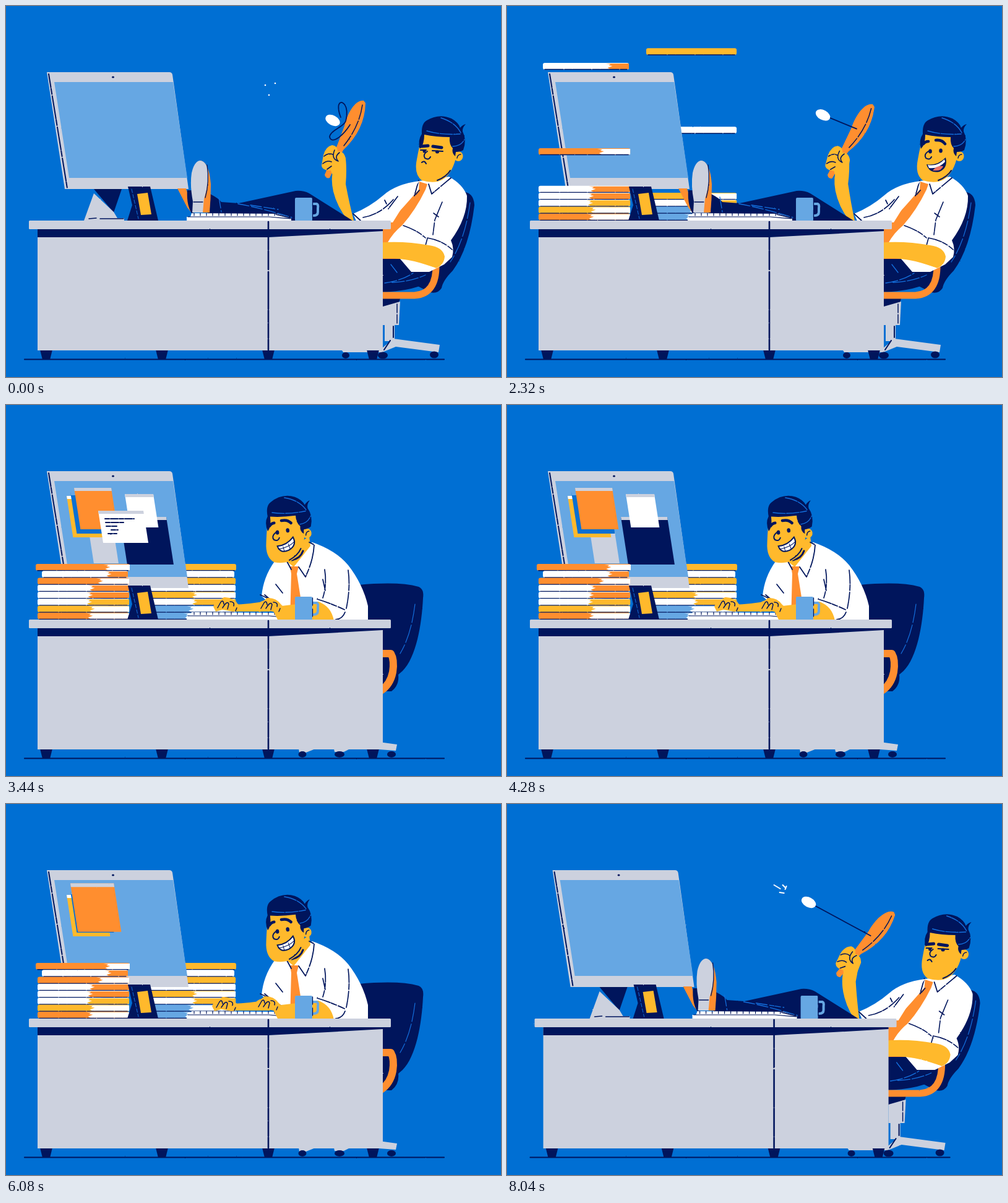
An HTML page that plays this animation: 800 px wide and 600 px high, repeating every 8120 ms.

```html
<!DOCTYPE html>
<html lang="en">
<head>
<meta charset="utf-8">
<title>Busy desk</title>
<style>
html, body { margin: 0; width: 100%; height: 100%; overflow: hidden; background: #006fd3; }
svg { display: block; width: 800px; height: 600px; }
</style>
</head>
<body>
<svg viewBox="0 0 800 600">
  <defs>
    <filter id="rough" filterUnits="userSpaceOnUse" x="0" y="0" width="800" height="600" color-interpolation-filters="sRGB">
      <feTurbulence type="fractalNoise" baseFrequency="0.35" numOctaves="1" seed="4" result="grain"/>
      <feDisplacementMap in="SourceGraphic" in2="grain" scale="1.7" xChannelSelector="R" yChannelSelector="G"/>
    </filter>
  </defs>
  <rect width="800" height="600" fill="#006fd3"/>
  <g id="stage" filter="url(#rough)"></g>
</svg>
<script>
const LOOP = 8120, STEP = 40;
const SIT = 3160, SIP = 6640, THROW = 2680, SLIDE = 7520;
const NAVY = '#00155c', GREY = '#ccd1de', SKY = '#66a7e3', BLUE = '#1470de',
      ORANGE = '#ff8e2f', SKIN = '#ffb92c', WHITE = '#fff', PINK = '#ea7268';

const clamp = x => Math.max(0, Math.min(1, x));
const span = (t, start, length) => clamp((t - start) / length);
const mix = (a, b, k) => a + (b - a) * k;
const easeOut = k => 1 - (1 - k) ** 3;
const easeInOut = k => k < .5 ? 4 * k ** 3 : 1 - 4 * (1 - k) ** 3;
const track = (keys, x) => {
  let i = 1;
  while (i < keys.length - 1 && x > keys[i][0]) i++;
  const [a, b] = [keys[i - 1], keys[i]];
  const k = clamp((x - a[0]) / (b[0] - a[0]));
  return a.slice(1).map((v, j) => mix(v, b[j + 1], k));
};

const fill = (d, color) => `<path d="${d}" fill="${color}"/>`;
const line = (d, color = NAVY, w = 2, dash = '') =>
  `<path d="${d}" fill="none" stroke="${color}" stroke-width="${w}" stroke-dasharray="${dash}" stroke-linecap="round" stroke-linejoin="round"/>`;
const rect = (x, y, w, h, color, r = 0) => `<rect x="${x}" y="${y}" width="${w}" height="${h}" rx="${r}" fill="${color}"/>`;
const oval = (x, y, rx, ry, color) => `<ellipse cx="${x}" cy="${y}" rx="${rx}" ry="${ry}" fill="${color}"/>`;
const group = (transform, content) => `<g transform="${transform}">${content}</g>`;
const ROUGH = '22 2 9 3 14 1';

// Head, drawn at its reclined place
const EYES = oval(684, 235, 2.8, 3.5, NAVY) + oval(701, 234, 2.8, 3.5, NAVY) +
  line('M673 223Q676 219 681 219M693 217Q703 216 708 223', NAVY, 4.5);
const OPEN_MOUTH = fill('M678 256Q695 259 709 245Q713 262 699 268Q682 271 678 256Z', NAVY) +
  fill('M680 257Q696 260 707 248L708 252Q697 264 682 262Z', WHITE) +
  fill('M688 266Q695 257 705 259Q702 268 688 266Z', PINK);
const FACES = {
  bored: line('M670 227L682 226M690 227L704 229', NAVY, 5) + line('M670 233H679M689 234L706 235') +
    oval(676, 235, 2.5, 2.5, NAVY) + oval(697, 236, 3, 2.5, NAVY) + line('M672 253Q676 249 679 255'),
  yawn: line('M670 226L682 225M690 226L704 228', NAVY, 5) + line('M670 233H680M690 234H705') +
    fill('M676 260Q678 248 694 248Q708 249 707 256Q702 269 683 268Q677 267 676 260Z', NAVY) +
    fill('M683 267Q685 259 696 258Q704 258 703 261Q695 269 683 267Z', PINK),
  happy: EYES + OPEN_MOUTH,
  grin: EYES + `<path d="M681 257Q696 258 708 246Q713 260 698 266Q684 270 681 257Z" fill="#fff" stroke="${NAVY}" stroke-width="2"/>` +
    line('M682 262Q698 262 710 253M690 259L691 267M699 256L701 265', NAVY, 1)
};
const head = face =>
  fill('M674 205Q668 225 664 248Q659 272 672 282Q702 291 716 271Q723 262 727 246L722 205Z', SKIN) +
  oval(731, 243, 7.5, 8, SKIN) + line('M729 246Q730 240 735 240', NAVY, 1.5) +
  fill('M672 207Q671 190 680 185Q700 173 720 182Q731 188 734 197Q738 192 743 191Q737 197 738 203Q745 216 739 233Q735 236 727 236L726 243Q720 238 722 230Q716 224 717 212Q695 212 676 208Q676 224 669 231Q665 217 672 207Z', NAVY) +
  line('M680 202Q704 209 734 207M703 181Q726 188 735 205M722 227Q735 227 741 216', BLUE, 1.4, '20 2') +
  line('M681 235Q673 240 677 246Q683 250 686 244') + line('M697 282Q712 276 718 266') + FACES[face];

// Furniture
const desk =
  line('M30 571.5H708', NAVY, 2.2, '90 1 40 0') +
  [55, 242, 414, 583].map(x => fill(`M${x} 556h20l-4 16h-12z`, NAVY)).join('') +
  rect(51, 361, 558, 196, GREY) + fill('M51 361H609V364L520 369L424 374H51Z', NAVY) +
  rect(37, 347, 585, 14, GREY, 1.5) + line('M424 349V556', NAVY, 2.6, '45 2 30 4 60 2');

const monitor =
  fill('M142 296H187L174 334Z', NAVY) + fill('M142 303L174 333L180 343H191V347H126Z', GREY) +
  line('M134 344L146 343M152 344H190', NAVY, 1.5) +
  fill('M66 107H264Q268 107 269 111L295 296H95Z', GREY) +
  fill('M78 123H270L293 278H102Z', SKY) + line('M69 110L99 295', NAVY, 2, ROUGH) + oval(173, 115, 2, 1.6, NAVY);

const photo = fill('M197 292H233L246 347H196L204 322Z', NAVY) +
  line('M203 296L214 344', BLUE, 1, '6 3') + fill('M212 304L229 302L235 337L218 338Z', SKIN);

const keyTicks = Array.from({ length: 14 }, (_, i) => `M${304 + i * 10} 335v4`).join('');
const keyboard = fill('M300 335L438 336L461 343V348H292V341H298Z', WHITE) +
  line(keyTicks, NAVY, 1.2) + line('M294 341H425L460 344', NAVY, 1.2, '80 1') + line('M436 337L460 343', NAVY, 1.5);

const mug = line('M496 320H502Q505 321 504 327V333Q504 339 497 339', SKY, 4) +
  rect(467, 310, 28, 38, SKY, 2) + line('M495.5 312V345', NAVY, 1.3, '12 6');

const legs =
  fill('M277 295H291L303 338L293 326Z', ORANGE) + fill('M293 298H303V340Q291 324 293 298Z', NAVY) +
  fill('M330 304Q345 312 348 317L376 319L468 299Q480 298 490 303L560 347H336L326 335Z', NAVY) +
  line('M344 309L348 333M375 320Q410 326 462 342M395 322L440 329', BLUE, 1.3, '18 4') +
  fill('M314 250Q328 252 331 288Q331 312 329 334H315Z', ORANGE) +
  fill('M313 250Q324 250 327 270Q327 290 320 312L318 334H301L302 316Q297 290 300 270Q304 252 313 250Z', GREY) +
  line('M303 317H318M325 257Q329 285 322 310', NAVY, 1.3);

// Stacks of folders: [left colour, split, right colour], top to bottom
const STACKS = {
  left: { x: 48, end: 200, start: 1760, rows: [
    [ORANGE, .72, WHITE], [WHITE, .73, ORANGE], [ORANGE, .64, WHITE], [WHITE, .55, ORANGE],
    [WHITE, .53, ORANGE], [WHITE, .52, SKIN], [SKIN, .55, WHITE], [ORANGE, .53, WHITE]] },
  right: { x: 222, end: 372, start: 1840, rows: [
    [SKIN, 1, SKIN], [WHITE, 1, WHITE], [SKIN, 1, SKIN], [WHITE, 1, WHITE],
    [SKIN, .5, WHITE], [WHITE, .5, SKIN], [SKY, .46, WHITE], [SKY, .42, WHITE]] }
};
function stack({ x, end, start, rows }, t) {
  return rows.map(([a, split, b], i) => {
    const k = span(t, start + (7 - i) * 60, 280);
    if (k <= 0) return '';
    const y = 257 + i * 11.25 - 360 * (1 - k * k);
    const inset = i === 1 ? 10 : i ? 3 : 0, w = end - x - inset * 1.3, cut = w * split, left = x + inset;
    const base = rect(left, y, w, 10.8, a, 3);
    const part = split < 1 ? fill(`M${left + cut} ${y + 1}l8 1l-3 2l6 1l-8 3l4 2h${w - cut - 7}v-9z`, b) : '';
    return base + part + line(`M${left + 3} ${y + 10.7}H${left + w - 3}`, NAVY, 1.5, '30 2 12 1');
  }).join('');
}

// Windows on the screen: [x, y, w, h, colour, opening, closing, header]
const WINDOWS = [
  [134, 205, 40, 51, GREY, 2400, 5560, GREY],
  [184, 181, 75, 77, NAVY, 2480, 5080, GREY],
  [98, 147, 60, 67, SKIN, 2560, 6520, WHITE],
  [104, 141, 60, 67, '#0a70d2', 2640, 6280, SKY],
  [110, 134, 60, 67, ORANGE, 2720, 6000, GREY],
  [192, 144, 46, 54, WHITE, 2800, 4600, GREY],
  [149, 171, 73, 52, WHITE, 2840, 3640, GREY]
];
function windowPane([x, y, w, h, color, opening, closing, header], t) {
  if (t < opening || t > closing + 200) return '';
  const scale = t < closing ? track([[0, .1], [80, 1.12], [160, 1]], t - opening)[0]
    : track([[0, 1], [80, 1.17], [200, 0]], t - closing)[0];
  const cx = x + w / 2 + h * .08, cy = y + h / 2;
  const pane = fill(`M${x} ${y}h${w}l${h * .155} ${h}h${-w}z`, color) + fill(`M${x} ${y}h${w}l.8 5h${-w}z`, header);
  const text = w === 73 ? line('M160 184H207M161 190H190M162 196H179M170 202H181M165 208H179', NAVY, 2, '7 2 12 2') : '';
  return group(`translate(${cx} ${cy}) scale(${scale}) translate(${-cx} ${-cy})`, pane + text);
}
const sparks = t => t >= 2880 && t < 3160
  ? line('M212 129V132M185 149L187 160M251 168H255M137 158L142 164M180 235L181 242M126 197H140', WHITE, 2) : '';

// Reclined man
const reclinedChair =
  fill('M602 346Q610 319 630 309L735 300Q756 300 757 322Q749 391 722 428Q706 444 704 456Q698 466 685 463L640 440Z', NAVY) +
  line('M750 318Q742 378 718 414', BLUE, 1.2, '26 4') +
  fill('M608 473H637L633 487H608Z', NAVY) + fill('M609 486L637 478L635 516H609Z', GREY) +
  line('M632 482V514', NAVY, 1.5, '14 3') + rect(612, 516, 16, 26, GREY) + line('M626 518V536', NAVY, 2) +
  fill('M543 557L606 555L626 538L701 548L699 560L630 551L608 560H545Z', GREY) + line('M611 556L621 541', NAVY) +
  oval(549, 565, 6, 5, NAVY) + oval(609, 565, 8, 5.5, NAVY) + oval(692, 564, 7, 5.5, NAVY);

const reclinedBody =
  fill('M600 409H646L690 422V441Q665 462 600 463Z', NAVY) +
  line('M622 418L632 431M612 448Q640 444 658 432M624 447Q654 446 678 435', BLUE, 1.3, '20 3') +
  line('M600 468H660Q696 466 695 418', ORANGE, 11) +
  fill('M645 293L668 283L716 276Q739 289 745 307Q746 342 719 379Q725 392 721 406L708 418L684 430L655 430L637 409H600V347H622Z', WHITE) +
  fill('M668 284L681 288L678 297Q662 330 640 355Q625 367 616 384H600V365Q625 345 645 322L667 297Z', ORANGE) +
  line('M667 282L660 307M662 305L668 298M683 288L688 304L719 278', NAVY, 1.8, ROUGH) +
  line('M642 355Q665 363 678 375M705 317L693 346L690 370M691 335L699 341M681 375Q705 379 721 394M681 376L678 387', NAVY, 1.6, ROUGH) +
  fill('M600 400H640L650 409H600Z', ORANGE) +
  fill('M600 383Q640 379 684 387Q706 390 709 405Q708 419 695 424C670 415 640 405 600 409Z', SKIN) +
  line('M643 411Q665 418 693 424', WHITE, 2);

const paddle = fill('M578 153C564 151 551 175 547 194L535 226L515 273Q517 280 523 278L545 233Q580 200 581 157Z', ORANGE) +
  line('M576 160Q571 195 546 226', NAVY, 1.5, '24 3');
const hand = fill('M513 241Q517 227 527 225Q536 226 536 235Q546 234 549 246L547 268L531 277Q526 271 525 266Q511 266 510 258Z', SKIN) +
  line('M514 243Q521 237 528 240M512 255Q519 249 526 252M519 264L526 259M531 233Q525 247 537 251Q530 244 539 237', NAVY, 1.6);

function bat(t) {
  const phase = ((t % 320) + 320) % 320 / 320;
  const [tilt] = track([[0, 0], [.25, 5], [.5, 12], [.75, 15.8], [1, 0]], phase);
  const [bx, by] = track([[0, 528, 185], [.15, 538, 190], [.5, 442, 142], [.75, 480, 159], [1, 528, 185]], phase);
  const k = tilt / 15.8, slack = phase < .2;
  const [ax, ay] = [mix(558, 580, k), mix(192, 213, k)];
  const cord = slack
    ? 'M541 180C535 165 537 155 543 156C552 160 552 175 549 186C545 196 526 200 523 211C524 222 540 217 556 192'
    : `M${bx} ${by}L${ax} ${ay}`;
  const burst = phase < .2 ? oval(419, 128, 1.3, 1.3, WHITE) + oval(435, 125, 1.3, 1.3, WHITE) + oval(425, 144, 1.3, 1.3, WHITE)
    : phase >= .5 ? line('M424 131L434 137M438 131L443 136M442 138L444 133M433 143L440 144', WHITE, 2) : '';
  return burst + group(`rotate(${k * 7} 558 345)`,
      fill('M530 262L549 247Q551 265 549 288Q555 320 562 347H553Q535 325 529 300Q524 278 530 262Z', SKIN)) +
    group(`translate(${8 * k} ${k}) rotate(${tilt} 519 278)`, paddle + hand) +
    line(cord, NAVY, 1.8, slack ? '12 1' : '') +
    group(`translate(${bx} ${by}) rotate(28)`, oval(0, 0, 12.5, 8, WHITE));
}
const loweredSleeve = fill('M668 283Q630 288 610 306Q588 325 561 336L567 350H625L650 310Z', WHITE) +
  line('M561 336L573 347M577 342Q605 337 626 313M615 320L612 314M633 308L618 328', NAVY, 1.7, ROUGH);
const raisedArm =
  fill('M568 232Q570 190 586 166Q603 146 626 132L632 124L655 108Q661 106 660 111L655 117L666 107Q673 105 671 111L663 119L681 109Q687 110 684 114L673 121L688 118Q694 121 689 125L668 133Q655 146 640 145Q618 168 608 192Q603 210 606 230Z', SKIN) +
  line('M643 123Q655 121 670 127L690 122M657 115L651 122M667 117L661 123', NAVY, 1.6) +
  fill('M567 231Q590 224 612 221L621 239Q640 262 669 283L645 312L620 313Q602 303 593 275Q570 251 566 241Z', WHITE) +
  line('M569 243Q573 252 590 248L618 238M618 297L628 306', NAVY, 1.8, ROUGH);

function reclined(t) {
  const thrown = t >= THROW;
  const face = t >= 2200 ? 'happy' : t >= 1000 && t < 1640 ? 'yawn' : 'bored';
  const fly = span(t, THROW, 240);
  const arm = !thrown ? loweredSleeve + bat(t)
    : group(`rotate(${-28 * (1 - easeOut(span(t, THROW, 160))) + 2 * Math.sin(span(t, 2840, 320) * Math.PI * 4)} 640 300)`, raisedArm) +
      (fly < 1 ? group(`translate(${40 * fly} ${-420 * fly}) rotate(${-300 * fly} 548 215)`, paddle) : '');
  return reclinedChair + reclinedBody + arm + head(face);
}

// Seated man
const seatedChair =
  fill('M570 291Q635 285 667 294Q676 298 674 312C672 355 663 408 641 430L634 436Q636 453 623 463H600V347H570Z', NAVY) +
  line('M661 322Q655 372 637 402', BLUE, 1.2, '30 4') +
  line('M600 402H622Q628 412 625 432Q621 452 606 462', ORANGE, 12) +
  fill('M473 556H500L485 562H474ZM530 556H556L546 561H531ZM603 545L632 549L630 559L603 557Z', GREY) +
  oval(479, 565, 6.5, 5, NAVY) + oval(539, 565, 8, 5, NAVY) + oval(623, 565, 7, 5, NAVY);
const seatedBody =
  fill('M440 248L495 222Q533 235 553 259Q577 290 585 325V349H440V334L413 309Q416 278 434 253Z', WHITE) +
  fill('M444 245L490 212L492 228L465 262Z', SKIN) + line('M462 251Q476 248 480 236', NAVY, 3) +
  fill('M459 261H473L470 273L482 349H459L461 273Z', ORANGE) +
  line('M454 253L461 266M473 262L484 278Q497 250 498 226L490 222', NAVY, 1.8, ROUGH) +
  line('M515 266Q519 290 512 312M512 282L516 300M553 267Q557 295 550 329M436 290L447 304', NAVY, 1.7, ROUGH);
const seatedHead = face => group('translate(-247 -31) rotate(-8 700 225)', head(face));
const typingHand = fill('M335 326Q338 317 347 315L352 311Q366 310 374 321L379 326Q377 334 366 334L350 331L339 334Z', SKIN) +
  line('M342 328L347 319Q351 314 352 322M350 328Q358 315 360 322L358 330M362 318Q370 318 368 325M373 328L371 333', NAVY, 1.5);
const heldMug = fill('M426 264Q440 262 453 267L444 307Q430 308 417 302Z', SKY) +
  line('M419 302Q432 308 443 306', NAVY, 1.2, '9 3') + line('M425 267Q420 285 419 299', NAVY, 1, '8 4');
const raisedForearm = fill('M442 281Q452 271 468 274Q478 277 480 288Q512 309 558 320L554 347H516Q492 334 475 309Q455 310 446 304Q441 292 449 291Z', SKIN) +
  line('M442 281Q448 276 455 281M445 292H453M447 300Q451 295 455 300', NAVY, 1.6) +
  fill('M524 310L562 318L570 349H546Q556 338 556 323Q540 320 524 310Z', WHITE) + line('M518 312Q545 321 559 322M557 328Q556 344 540 346', NAVY, 1.7, ROUGH);

function seated(t) {
  const sipping = t >= SIP;
  const shift = 82 * (1 - easeOut(span(t, SIT, 240)));
  const beat = t >= 3400 && Math.floor(t / 80) % 2 === 0 ? 1 : 0;
  const lift = 1 - easeOut(span(t, SIP, 160));
  const leftArm = fill('M366 323Q395 322 421 317L427 334H368Z', SKIN) + line('M411 307Q430 315 454 333M418 307L430 317', NAVY, 1.7, ROUGH) +
    group(`translate(${-2 * beat} ${beat})`, typingHand);
  const rightArm = sipping
    ? group(`translate(${26 * lift} ${42 * lift})`, heldMug + raisedForearm)
    : fill('M432 333L445 325L505 318Q526 326 530 349H440Z', SKIN) +
      line('M503 314Q526 321 547 331M548 335Q544 346 533 347', NAVY, 1.8, ROUGH) +
      group(`translate(${70 - 4 * beat} ${1 - beat})`, typingHand);
  return {
    back: group(`translate(${shift} 0)`, seatedChair + seatedBody + seatedHead(sipping ? 'happy' : 'grin')),
    front: group(`translate(${shift} 0)`, leftArm + rightArm) + (sipping ? '' : mug)
  };
}

function scene(t) {
  const resting = t < SIT;
  const man = resting ? { back: reclined(t), front: legs + keyboard + mug } : seated(t);
  return man.back + stack(STACKS.right, t) + monitor + WINDOWS.map(w => windowPane(w, t)).join('') + sparks(t) +
    stack(STACKS.left, t) + photo + (resting ? '' : keyboard) + man.front + desk;
}

const stage = document.getElementById('stage');
let shown = -1;
function draw(now) {
  const t = Math.floor(now % LOOP / STEP) * STEP;
  if (t !== shown) {
    shown = t;
    const x = 800 * easeInOut(span(t, SLIDE, LOOP - SLIDE));
    stage.innerHTML = group(`translate(${-x} 0)`, scene(t)) +
      (x > 0 ? group(`translate(${800 - x} 0)`, scene(t - LOOP)) : '');
  }
  requestAnimationFrame(draw);
}
draw(performance.now());
</script>
</body>
</html>
```
